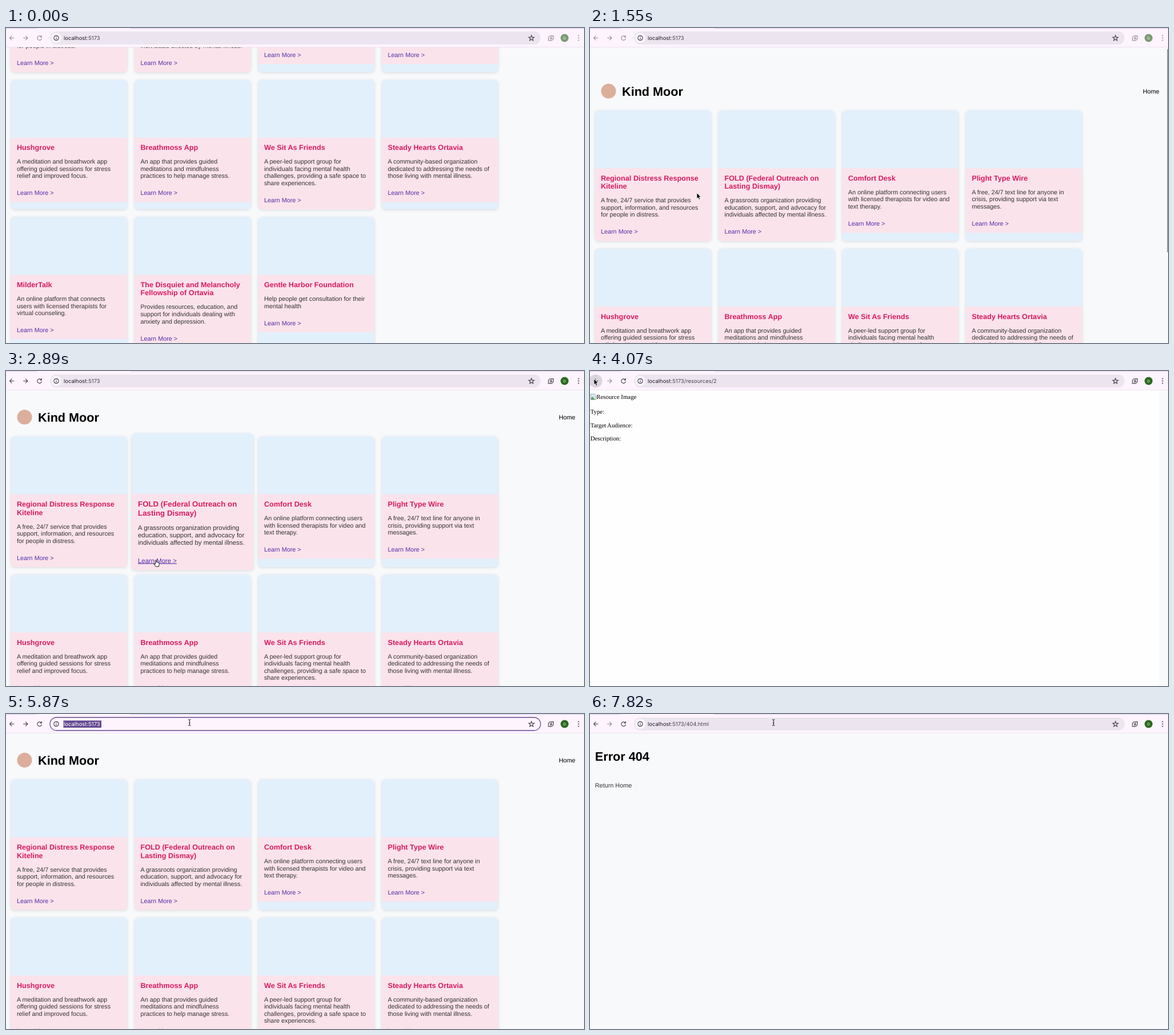
Animation of 1012 by 553 pixels, one loop 8 s. Source, as an HTML page:

```html
<!DOCTYPE html>
<html lang="en">
<head>
<meta charset="utf-8">
<title>Resource cards</title>
<style>
html, body { margin: 0; width: 100%; height: 100%; overflow: hidden; background: #f8f9fb; }
svg { display: block; width: 1012px; height: 553px; text-rendering: geometricPrecision; }
text { white-space: pre; }
.web { font: 10.83px "Liberation Sans", Arial, sans-serif; fill: #333; }
.h1 { font: bold 21.65px "Liberation Sans", Arial, sans-serif; fill: #000; }
.h3 { font: bold 12.67px "Liberation Sans", Arial, sans-serif; fill: #d81b60; }
.link { fill: #512da8; }
.serif { font: 10.83px "Liberation Serif", "Times New Roman", serif; fill: #000; }
.ui { font: 9.47px Inter, Roboto, sans-serif; fill: #211c26; }
.line { fill: none; stroke: currentColor; stroke-width: 1.15; }
.card { filter: drop-shadow(0 1.4px 2.4px rgba(0,0,0,.13)); }
</style>
</head>
<body>
<svg id="stage" viewBox="0 0 1012 553" xmlns="http://www.w3.org/2000/svg"></svg>
<script>
const stage = document.getElementById('stage');
const LOOP = 8000;
const CARD_W = 203, STEP_X = 216.5, LEFT = 8.8, TOP = 114.9, GAP = 13.5;
const INK = '#443e4a', FADED = '#968e9a', PURPLE = '#654a90', BAR = '#fdf4fe', PILL = '#ece5ef';

function add(parent, tag, attrs = {}, text) {
  const el = document.createElementNS('http://www.w3.org/2000/svg', tag);
  for (const k in attrs) el.setAttribute(k, attrs[k]);
  if (text !== undefined) el.textContent = text;
  parent.appendChild(el);
  return el;
}
const group = (parent, attrs) => add(parent, 'g', attrs);
const label = (parent, x, y, text, cls, extra = {}) =>
  add(parent, 'text', { x, y, class: cls, ...extra }, text);
const rect = (parent, x, y, width, height, fill, rx = 0) =>
  add(parent, 'rect', { x, y, width, height, fill, rx });
const circle = (parent, cx, cy, r, fill) => add(parent, 'circle', { cx, cy, r, fill });
const line = (parent, d) => add(parent, 'path', { d, class: 'line' });
const show = (el, on) => el.setAttribute('display', on ? 'inline' : 'none');
const logo = (parent, x, y, r) => circle(parent, x, y, r, '#dcae9c');

// Each card: title lines | description lines
const rows = [
  ['Regional Distress Response/Kiteline|A free, 24~7 service that provides/support, information, and resources/for people in distress.',
   'FOLD (Federal Outreach on/Lasting Dismay)|A grassroots organization providing/education, support, and advocacy for/individuals affected by mental illness.',
   'Comfort Desk|An online platform connecting users/with licensed therapists for video and/text therapy.',
   'Plight Type Wire|A free, 24~7 text line for anyone in/crisis, providing support via text/messages.'],
  ['Hushgrove|A meditation and breathwork app/offering guided sessions for stress/relief and improved focus.',
   'Breathmoss App|An app that provides guided/meditations and mindfulness/practices to help manage stress.',
   'We Sit As Friends|A peer-led support group for/individuals facing mental health/challenges, providing a safe space to/share experiences.',
   'Steady Hearts Ortavia|A community-based organization/dedicated to addressing the needs of/those living with mental illness.'],
  ['MilderTalk|An online platform that connects/users with licensed therapists for/virtual counseling.',
   'The Disquiet and Melancholy/Fellowship of Ortavia|Provides resources, education, and/support for individuals dealing with/anxiety and depression.',
   'Gentle Harbor Foundation|Help people get consultation for their/mental health']
];
const split = s => s.split('|').map(p => p.split('/').map(l => l.replace('~', '/')));
const bodyHeight = ([title, desc]) => 162.55 + 14.5 * title.length + 12.55 * desc.length;

function drawCard(parent, x, y, height, [title, desc], own) {
  const g = group(parent, { class: 'card' });
  rect(g, x, y, CARD_W, height, '#e2f0fc', 6.8);
  const r = height - own < 1 ? 6.8 : 0, top = y + 101.5, end = y + own;
  add(g, 'path', { fill: '#fbe3eb', d: `M${x},${top}h${CARD_W}V${end - r}q0,${r} ${-r},${r}H${x + r}q${-r},0 ${-r},${-r}Z` });
  const tx = x + 10.15;
  let base = y + 123.1;
  title.forEach((s, i) => label(g, tx, base + 14.5 * i, s, 'h3'));
  base += 14.5 * (title.length - 1) + 24;
  desc.forEach((s, i) => label(g, tx, base + 12.55 * i, s, 'web'));
  base += 12.55 * (desc.length - 1) + 30;
  const link = label(g, tx, base, 'Learn More >', 'web link');
  return { g, link, cx: x + CARD_W / 2, cy: y + height / 2 };
}

// Home page
const home = group(stage);
logo(home, 32.5, 81, 13);
label(home, 56, 88.8, 'Kind Moor', 'h1');
label(home, 968, 84.7, 'Home', 'web', { style: 'fill:#000' });
const cards = [];
let rowY = TOP;
for (const row of rows) {
  const items = row.map(split), height = Math.max(...items.map(bodyHeight));
  items.forEach((it, i) => cards.push(drawCard(home, LEFT + STEP_X * i, rowY, height, it, bodyHeight(it))));
  rowY += height + GAP;
}
const hot = cards[1];
const thumb = rect(stage, 1010.6, 37, 3, 357, '#85868a', 1);

// Detail page
const detail = group(stage);
rect(detail, 0, 34, 1012, 519, '#f8f9fb');
rect(detail, 1, 34, 996, 519, '#fefefe');
add(detail, 'path', { d: 'M1.3,40.3h6.4l2.6,2.6v7.6h-9Z', fill: '#d9e6f7', stroke: '#9a9da3', 'stroke-width': .8 });
add(detail, 'path', { d: 'M2,50v-2.5l2.5,-2.5 4,5Z', fill: '#5fa255' });
label(detail, 11.3, 49, 'Resource Image', 'serif');
['Type:', 'Target Audience:', 'Description:'].forEach((s, i) => label(detail, .7, 75.3 + 23.4 * i, s, 'serif'));

// Error page
const error = group(stage);
rect(error, 0, 34, 1012, 519, '#f8f9fb');
label(error, 8.8, 82, 'Error 404', 'h1');
label(error, 8.8, 128.9, 'Return Home', 'web');

// Toolbar
const bar = group(stage);
rect(bar, 0, 0, 1012, 34, BAR);
rect(bar, 0, 0, 54, 1.5, '#e6dcf0');
rect(bar, 218, 0, 794, 1.5, '#e6dcf0');
rect(bar, 0, 33, 1012, 1, '#efe5f0');
const backGlow = circle(bar, 10, 17.5, 11.5, '#ddd4e0');
const back = group(bar), forward = group(bar), tools = group(bar);
line(back, 'M14.3,17.5H6.8M10.4,13.7L6.6,17.5l3.8,3.8');
line(forward, 'M30.2,17.5h7.5M34.1,13.7l3.8,3.8l-3.8,3.8');
line(tools, 'M61.6,15.2A3.8,3.8 0 1 0 62.4,18.3M62.3,13v3h-3');
const pill = rect(bar, 77, 6, 859, 23, PILL, 11.5);
const infoDisc = circle(bar, 88, 17.5, 9, '#fbf6fd');
const info = group(bar, { color: INK });
line(info, 'M88,13.3a4.2,4.2 0 1 1 -.01,0M88,17v2.7M88,15v1.1');
const selection = rect(bar, 100.5, 11.5, 66.5, 12.5, PURPLE);
const url = label(bar, 101, 20.9, '', 'ui');
const host = add(url, 'tspan', {}, 'localhost');
const path = add(url, 'tspan');
const caret = rect(bar, 167, 12, .8, 11.5, INK);
const star = group(bar, { color: INK });
let starPath = '';
for (let i = 0; i < 10; i++) {
  const r = i % 2 ? 2.1 : 5, a = Math.PI * (i / 5 - .5);
  starPath += `${i ? 'L' : 'M'}${920 + r * Math.cos(a)},${17.9 + r * Math.sin(a)}`;
}
line(star, starPath + 'Z');
line(tools, 'M950.2,21.2C948.4,17 950.3,13.6 954.5,13.6H958.3V17.5C958.3,21.4 954,23.3 950.2,21.2ZM950.2,21.2L949,22.4');
line(tools, 'M955.3,15l-2.4,2.8h2.8l-2.2,2.6');
const avatar = circle(bar, 978, 17.5, 7, '#2c6a20');
label(bar, 978, 19.6, 'D', 'ui', { 'text-anchor': 'middle', style: 'font-size:6px;fill:#fff' });
for (const dy of [-4, 0, 4]) circle(tools, 1002.5, 17.5 + dy, 1.1, 'currentColor');

// Suggestion list
const drop = group(stage);
const sheet = rect(drop, 72, 2, 868.5, 225, BAR, 10);
sheet.style.filter = 'drop-shadow(0 3px 4px rgba(60,40,80,.35))';
add(drop, 'path', { d: 'M72,33H916a13,13 0 0 1 0,26H72Z', fill: '#f1e8f3' });
rect(drop, 72, 33, 2.7, 26.5, PURPLE, 1);
logo(drop, 93, 17.5, 3.8);
label(drop, 110, 20.9, 'localhost:5173/', 'ui');
const mark = rect(drop, 177.6, 11.5, 35.8, 12.5, PURPLE);
const guess = label(drop, 178, 20.9, 'xxxxxxx', 'ui');
const close = group(drop, { color: INK });
line(close, 'M907.7,43.2l5.6,5.6M913.3,43.2l-5.6,5.6');

const site = 'Kind Moor', page = 'Your Resource Page';
const hints = [[site, '/', 'xxxxxxx'], [page, '/', 'resources/1'], null, [site, '', ''],
  [site, '/', '3'], [page, '/', 'resources/2'], [page, '/', 'resources/3']];
hints.forEach((h, i) => {
  const y = 46 + 27.08 * i, icon = group(drop, { color: INK });
  const text = label(drop, 110, y + 3.4, '', 'ui');
  if (!h) {
    line(icon, `M94.3,${y + 1.4}l2.6,2.6M91.9,${y - 3.6}a2.9,2.9 0 1 1 -.01,0`);
    add(text, 'tspan', {}, 'localhost:5173/');
    add(text, 'tspan', { fill: INK }, ' - Wendle Search');
    return;
  }
  if (h[0] === site) logo(icon, 93, y, 3.8);
  else {
    circle(icon, 93, y, 4.6, INK);
    add(icon, 'path', { fill: BAR, d: `M89.6,${y - .8}l2.6,2.5v1.8q-2.6,-.9 -2.6,-4.3ZM93.5,${y - 3.4}l2.6,1.6v2.6l-1.8,1.7l-.8,-1.8h-2l.3,-1.7l1.7,-.6Z` });
  }
  add(text, 'tspan', {}, h[0] + ' - ');
  add(text, 'tspan', { fill: PURPLE, 'font-weight': 700 }, 'localhost:5173' + h[1]);
  add(text, 'tspan', { fill: PURPLE }, h[2]);
});

// Pointers, drawn from their hot spot
const pointer = group(stage);
const arrow = add(pointer, 'path', { d: 'M0,0V10.2L2.3,8.1L3.9,11.7L5.8,10.9L4.2,7.4H7.4Z', fill: '#000', stroke: '#fff', 'stroke-width': .8 });
const hand = add(pointer, 'path', { d: 'M-.9,.7Q0,-.5 .9,.7V4.2Q2,3.6 2.6,4.5Q3.8,4 4.2,5Q5.6,4.7 5.7,6V8.3L4.7,11.8H-.2L-3.4,7.4Q-3,6.2 -.9,7.6Z', fill: '#fff', stroke: '#000', 'stroke-width': .9 });
const beam = add(pointer, 'path', { d: 'M-2.2,-5.4Q0,-5.4 0,-4V4Q0,5.4 -2.2,5.4M2.2,-5.4Q0,-5.4 0,-4M0,4Q0,5.4 2.2,5.4M-1.2,.9H1.2', fill: 'none', stroke: '#111', 'stroke-width': .95 });

// Keys are [time, value, value...], joined by straight lines
function track(keys, t) {
  let i = 0;
  while (i < keys.length - 1 && keys[i + 1][0] <= t) i++;
  const a = keys[i], b = keys[i + 1];
  if (!b || t <= a[0]) return a.slice(1);
  const p = (t - a[0]) / (b[0] - a[0]);
  return a.slice(1).map((v, n) => v + (b[n + 1] - v) * p);
}
const scrollKeys = [[690, -266.5], [830, -232], [980, -150], [1120, -70], [1270, -14], [1410, 20],
  [1550, 30], [1690, 17], [1840, 7], [1990, 2], [2130, 0]];
const hoverKeys = [[2600, 0], [2740, .4], [2880, .96], [3040, 1], [3060, 0], [4380, 0], [4670, .8],
  [4815, 1], [5130, 1], [5280, .5], [5420, 0]];
const moveKeys = [[1990, 187, 289.5], [2430, 217, 312], [2600, 217, 312], [2740, 245, 325], [2880, 262.5, 331.5],
  [3190, 262.5, 331.5], [3340, 150, 185], [3475, 44, 40], [3630, 44, 40], [3775, 7, 14], [4220, 7, 14],
  [4370, 60, 70], [4520, 190, 185], [4670, 262, 245], [4815, 291.7, 268], [4970, 300, 225], [5120, 311, 145],
  [5270, 318, 75], [5420, 321, 30], [5560, 321.3, 15]];

function capture(t) {
  if (t < 815) return 0;
  const [from, gap] = t < 1825 ? [830, 144.3] : [1840, 149.5];
  return from + Math.floor((t - from + 15) / gap) * gap;
}

function render(time) {
  const t = capture(time), within = (a, b) => t >= a && t < b;
  const onDetail = within(3000, 4180), onError = t >= 7630;
  const active = t >= 2100, focus = within(5680, 6580), open = within(6580, 7330), loading = within(7330, 7630);

  const [dy] = track(scrollKeys, t), [hover] = track(hoverKeys, t), k = 1 + .05 * hover;
  home.setAttribute('transform', `translate(0,${dy})`);
  hot.g.setAttribute('transform', `translate(${hot.cx},${hot.cy}) scale(${k}) translate(${-hot.cx},${-hot.cy})`);
  hot.link.setAttribute('text-decoration', within(2850, 3000) ? 'underline' : 'none');
  show(home, !onDetail && !onError);
  show(detail, onDetail);
  show(error, onError);

  show(thumb, within(800, 2250));
  thumb.setAttribute('y', 37 + Math.max(0, -dy) * .55);
  thumb.setAttribute('height', 366 - Math.max(0, dy) * .3);
  thumb.setAttribute('opacity', t > 2100 ? .5 : 1);

  const tone = active ? INK : FADED;
  back.setAttribute('color', tone);
  tools.setAttribute('color', tone);
  forward.setAttribute('color', active && !onDetail && !onError ? INK : FADED);
  avatar.setAttribute('fill', active ? '#2c6a20' : '#7d9a75');
  show(backGlow, within(3740, 4330));

  pill.setAttribute('fill', focus || loading ? BAR : within(5380, 5680) ? '#e5dde9' : PILL);
  pill.setAttribute('stroke', focus ? PURPLE : 'none');
  pill.setAttribute('stroke-width', 1.3);
  show(infoDisc, !focus && !loading);
  const picked = within(5680, 5980);
  show(selection, picked);
  show(caret, within(5980, 6580));
  host.setAttribute('fill', picked ? '#fff' : '#211c26');
  path.setAttribute('fill', picked ? '#fff' : '#4b4551');
  path.textContent = ':5173' + (onDetail ? '/resources/2' : onError ? '/404.html' : loading ? '/xxxxxxx' : '');

  show(drop, open);
  const suggested = t < 7180;
  show(mark, suggested);
  guess.style.fill = suggested ? '#fff' : '#211c26';

  const [x, y] = track(moveKeys, t);
  pointer.setAttribute('transform', `translate(${x},${y - (open ? 1 : 0)})`);
  const isHand = within(2850, 3000), isBeam = within(4780, 5080) || (t >= 5530 && !open);
  show(pointer, t >= 1100);
  show(hand, isHand);
  show(beam, isBeam);
  show(arrow, !isHand && !isBeam);
}

const start = performance.now();
function tick() {
  render((performance.now() - start) % LOOP);
  requestAnimationFrame(tick);
}
tick();
</script>
</body>
</html>
```
